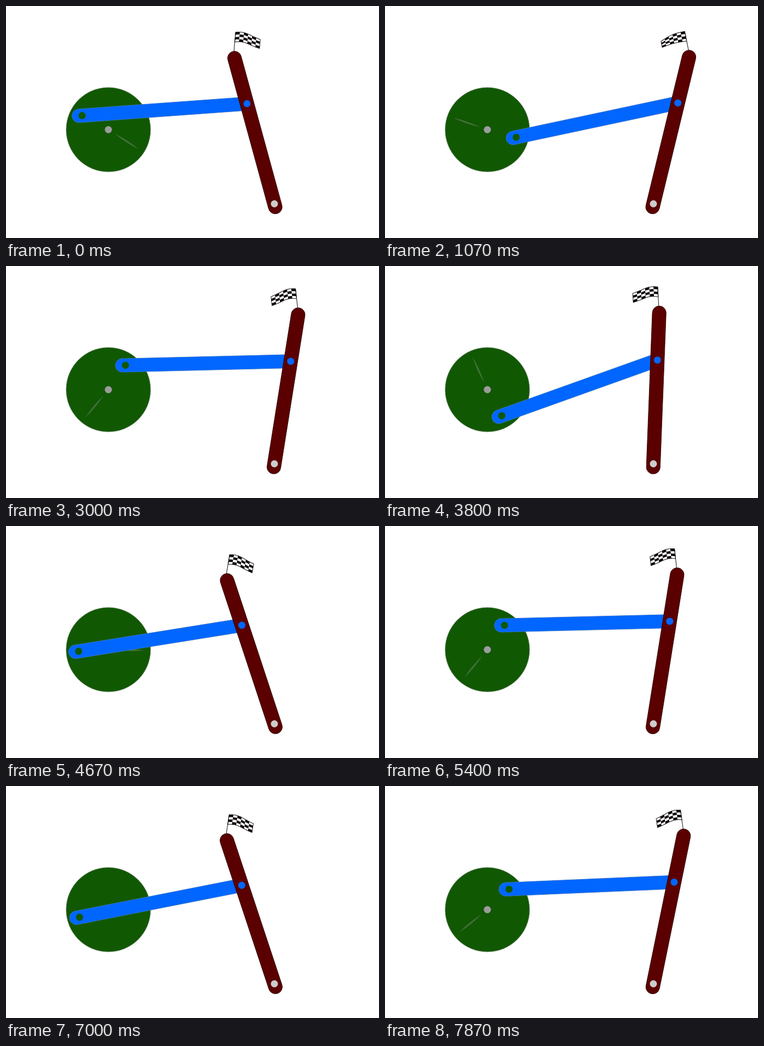
Animation of 681 by 424 pixels, one loop 8 s. Source, as an HTML page with a canvas:

```html
<!DOCTYPE html>
<html lang="en">
<head>
<meta charset="utf-8">
<title>Crank and rocker</title>
<style>
  html, body { margin: 0; width: 100%; height: 100%; overflow: hidden; background: #fff; }
  canvas { display: block; width: 681px; height: 424px; }
</style>
</head>
<body>
<canvas id="stage" width="681" height="424"></canvas>
<script>
const ctx = document.getElementById('stage').getContext('2d');
const LOOP = 8000, SLOT = 200 / 3, CYCLE = 29, RAD = Math.PI / 180;

const HUB = { x: 186.9, y: 226 }, PIVOT = { x: 490, y: 361.5 };
const CRANK = 54.4, COUPLER = 301.8, ROCKER = 189.7;
const GREEN = '#115803', BLUE = '#0066ff', MAROON = '#5a0000';

// [step, degrees]; the cycle restarts with a hard jump at step 3
const CRANK_KEYS = [[3, 262], [7, 305], [13, 374.8], [27, 536.9], [29, 568.2], [31, 590]];
const FLAG_KEYS = [[3, 4], [4, -1], [7, -6.4], [8, -8], [13, -11.5], [16, -6],
  [18, 0], [20, 3], [27, 9.7], [29, 5], [31, 4]];

function lerpKeys(keys, x) {
  let i = 1;
  while (i < keys.length - 1 && keys[i][0] < x) i++;
  const [x0, y0] = keys[i - 1], [x1, y1] = keys[i];
  return y0 + (y1 - y0) * (x - x0) / (x1 - x0);
}

// Twelve poses a second shown in fifteen slots: every fifth slot or so holds.
function poseIndex(t) {
  let slot = Math.floor((t + 3.4) / SLOT);
  if (Math.round(slot * SLOT / 10) * 10 > t) slot--;
  let held = 0;
  for (let n = 1; n <= 24; n++) {
    const hold = 5 * n - (n > 5 && n !== 12 ? 1 : 0);
    if (hold <= slot) held++;
  }
  return slot - held;
}

function polar(o, r, deg) {
  return { x: o.x + r * Math.cos(deg * RAD), y: o.y + r * Math.sin(deg * RAD) };
}

function findJoint(pin) {
  const dx = PIVOT.x - pin.x, dy = PIVOT.y - pin.y, d = Math.hypot(dx, dy);
  const a = (COUPLER ** 2 - ROCKER ** 2 + d * d) / (2 * d);
  const h = Math.sqrt(Math.max(0, COUPLER ** 2 - a * a));
  return { x: pin.x + (a * dx + h * dy) / d, y: pin.y + (a * dy - h * dx) / d };
}

function disc(p, r, fill, edge) {
  ctx.beginPath();
  ctx.arc(p.x, p.y, r, 0, 2 * Math.PI);
  ctx.fillStyle = fill;
  ctx.fill();
  if (edge) { ctx.strokeStyle = edge; ctx.lineWidth = 0.8; ctx.stroke(); }
}

// Bar along the local x axis, rounded at the start and optionally at the end
function bar(p, angle, from, to, r, roundEnd, fill, edge) {
  ctx.save();
  ctx.translate(p.x, p.y);
  ctx.rotate(angle);
  ctx.beginPath();
  ctx.arc(from, 0, r, Math.PI / 2, Math.PI * 1.5);
  if (roundEnd) ctx.arc(to, 0, r, -Math.PI / 2, Math.PI / 2);
  else { ctx.lineTo(to, -r); ctx.lineTo(to, r); }
  ctx.closePath();
  ctx.fillStyle = fill;
  ctx.fill();
  ctx.strokeStyle = edge;
  ctx.lineWidth = 0.8;
  ctx.stroke();
  ctx.restore();
}

function glint(deg) {
  ctx.save();
  ctx.translate(HUB.x, HUB.y);
  ctx.rotate(deg * RAD);
  ctx.beginPath();
  ctx.moveTo(14, 0);
  ctx.quadraticCurveTo(40, -3.2, 66, 0);
  ctx.quadraticCurveTo(40, 3.2, 14, 0);
  ctx.fillStyle = '#41703a';
  ctx.fill();
  ctx.restore();
}

function flag(base, deg, side, curl) {
  const COLS = 6, ROWS = 4, W = 46;
  const point = (u, v) => {
    const top = -34.5 + 9.3 * u - 3.2 * Math.sin(Math.PI * u) - (1 - curl) * Math.sin(2 * Math.PI * u);
    return [W * u, top + v * (18 - 1.5 * u - 5.5 * curl * u * u)];
  };
  const patch = (u0, u1, v0, v1) => {
    const n = Math.ceil((u1 - u0) * 28);
    ctx.beginPath();
    for (let i = 0; i <= n; i++) ctx.lineTo(...point(u0 + (u1 - u0) * i / n, v0));
    for (let i = n; i >= 0; i--) ctx.lineTo(...point(u0 + (u1 - u0) * i / n, v1));
    ctx.closePath();
  };
  ctx.save();
  ctx.translate(base.x, base.y);
  ctx.rotate(deg * RAD);
  ctx.scale(side, 1);
  patch(0, 1, 0, 1);
  ctx.fillStyle = '#fff';
  ctx.fill();
  ctx.fillStyle = '#0c0204';
  for (let c = 0; c < COLS; c++) {
    for (let r = c % 2; r < ROWS; r += 2) {
      patch(c / COLS, (c + 1) / COLS, r / ROWS, (r + 1) / ROWS);
      ctx.fill();
    }
  }
  ctx.strokeStyle = '#111';
  ctx.lineWidth = 1;
  patch(0, 1, 0, 1);
  ctx.stroke();
  ctx.beginPath();
  ctx.moveTo(0, -34.5);
  ctx.lineTo(0, 3);
  ctx.stroke();
  ctx.restore();
}

function draw(t) {
  let step = poseIndex(t) % CYCLE;
  if (step < 3) step += CYCLE;
  const deg = lerpKeys(CRANK_KEYS, step);
  const pin = polar(HUB, CRANK, deg);
  const joint = findJoint(pin);
  const lean = Math.atan2(joint.y - PIVOT.y, joint.x - PIVOT.x);
  const tip = polar(PIVOT, 276, lean / RAD);
  const side = joint.x > PIVOT.x ? -1 : 1;
  const curl = Math.max(0, 1 - Math.abs(step - 13) / 2);

  ctx.fillStyle = '#fff';
  ctx.fillRect(0, 0, 681, 424);
  disc(HUB, 77, GREEN, '#5d7a58');
  glint(deg + 184.5);
  disc(HUB, 6.5, '#9c9c9c');
  bar(pin, Math.atan2(joint.y - pin.y, joint.x - pin.x), -6, COUPLER, 12.4, false, BLUE, '#3f78c4');
  disc(pin, 6.5, GREEN);
  flag({ x: tip.x - 1, y: tip.y - 13 }, lerpKeys(FLAG_KEYS, step), side, curl);
  bar(PIVOT, lean, -6, 276, 12.6, true, MAROON, '#2a0000');
  disc(joint, 6.5, BLUE);
  disc(PIVOT, 6.5, '#cccccc');
}

const start = performance.now();
function tick() {
  draw((performance.now() - start) % LOOP);
  requestAnimationFrame(tick);
}
tick();
</script>
</body>
</html>
```
